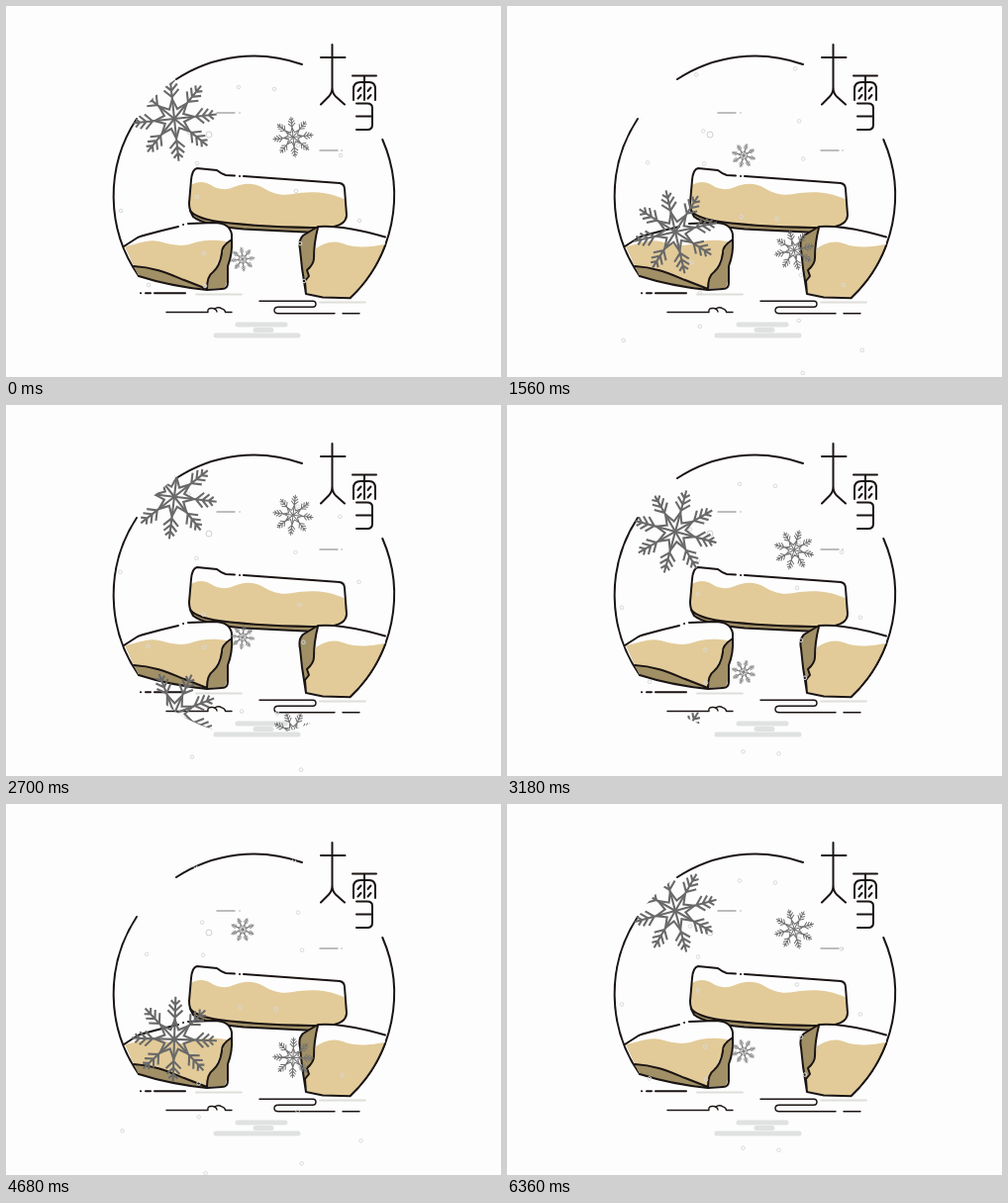
Animation of 500x375 px, one loop 6420 ms. Source, as an HTML page:

```html
<!DOCTYPE html>
<html lang="zh">
<head>
<meta charset="utf-8">
<title>大雪</title>
<style>
html, body { margin: 0; width: 100%; height: 100%; overflow: hidden; background: #fdfdfd; }
svg { display: block; width: 500px; height: 375px; }
.ink { fill: none; stroke: #1a1413; stroke-width: 2; stroke-linecap: round; stroke-linejoin: round; }
.thin { stroke-width: 1.4; }
.snow { fill: #fdfdfd; }
.tan { fill: #e2cb99; }
.dark { fill: #a18f66; }
.gray { fill: none; stroke: #a9a9a9; stroke-width: 1.4; stroke-linecap: round; }
.pale { fill: none; stroke: #dededa; stroke-width: 1.8; stroke-linecap: round; }
.mist { fill: none; stroke: #e0e1e1; stroke-width: 5; stroke-linecap: round; }
.dot { fill: none; stroke: #d9d9d9; stroke-width: 1; }
</style>
</head>
<body>
<svg viewBox="0 0 500 375" role="img" aria-label="大雪">
  <defs>
    <clipPath id="moon"><circle cx="250" cy="192" r="142"/></clipPath>
    <clipPath id="sky"><path d="M108 192A142 142 0 0 1 392 192V375H108Z"/></clipPath>
    <g id="flake" fill="none"></g>
  </defs>

  <!-- mist and ground lines -->
  <path class="mist" d="M234 322H282M252 327.500H268M212 333H295"/>
  <path class="pale" d="M192 291.500H238M317 299.500H363"/>
  <path class="gray" d="M213 108H231M236 108h.1M317 146H335M339 146h.1"/>
  <circle class="dot" cx="205" cy="130" r="3" style="stroke:#d0d0d0"/>
  <path class="ink" d="M136 290.300h.1M141 290.300H146M150 290.300H181"/>
  <path class="ink thin" d="M162 309.500H204Q203 305 208.500 305.500Q212.500 306 213 309M210.500 306.300Q214 303.500 218 305.800Q221.500 307 221.500 309.500H228"/>
  <path class="ink thin" d="M256 298.300H310Q313 298.300 313 301.300T310 304.300H275Q271 304.300 271 307.500T275 310.700H332M340 310.700H357"/>

  <!-- ring -->
  <path class="ink" d="M172 74A142 142 0 0 1 299 59M132 114A142 142 0 0 0 134 273M380.300 135A142 142 0 0 1 347.500 295"/>

  <!-- top stone -->
  <path class="dark" d="M186 207L189 213Q200 222 240 225.500L312 229Q326 229 329 223L262 218Z"/>
  <path class="snow" d="M193 164L213 166Q218 170 222 171L337 179Q342 180 342 186L343 197L187 188Q187 165 193 164Z"/>
  <path class="tan" d="M187 181C193 177 201 177 207 181S221 187 230 183S250 178 260 184S278 192 290 190S322 186 343 196L344 211Q344 222 325 224C290 224 245 222 215 218Q192 215 186 207L185 199Z"/>
  <path class="ink" d="M231 171.500L222 171Q218 170 213 166L193 164Q188 165 187 176L185 199Q185 205 187 208Q194 215 215 218C245 222 290 224 325 224Q344 222 344 211L342 185Q342 180 337 179L240 172M236 172h.1M186 207L189 213Q200 222 240 225.500L312 229"/>

  <!-- left stone -->
  <path class="snow" d="M119 243L133 234L179 221L210 219Q226 219 228 231V238L222 243L203 286L134 272Z"/>
  <path class="tan" d="M120 243C132 241 143 235 155 238S176 244 188 240S210 236 223 238L218 250L202 286L180 277C165 271 150 264 129 263Z"/>
  <path class="dark" d="M129 263C150 264 165 271 180 277L202 286Q165 283 134 273Z"/>
  <path class="dark" d="M227 237Q217 243 218 250Q216 263 209 269Q203 273 203 286L220 285Q224 283 224 263Q229 251 227 237Z"/>
  <path class="ink" d="M119 243L133 234Q137 232 174 223M179 221h.1M184 220L210 219Q226 219 228 231V236Q217 243 218 250Q216 263 209 269Q203 273 203 286L180 277C165 271 150 264 129 263M228 236Q229 250 224 263V280Q224 286 218 286L203 287Q165 283 134 273"/>

  <!-- right stone -->
  <path class="snow" d="M315 223Q340 221 383 234V242L348 295L304 290Z"/>
  <path class="tan" d="M313 245C322 239 330 237 340 240C355 246 370 243 383 241A142 142 0 0 1 347.500 295L320 294L304 290L302 278L306 273L304 267L311 256Z"/>
  <path class="dark" d="M315 223L300 232Q295 237 297 246L299 265L304 291L302 278L306 273L304 267Q311 261 311 255Q311 240 315 223Z"/>
  <path class="ink" d="M383 233.500Q340 221 315 223L300 232Q295 237 297 246L299 265L303 291L320 294.500L347.500 295.300A142 142 0 0 0 383 242M315 224Q311 240 311 255Q311 261 304 267L306 273L302 278L303 291"/>

  <!-- lettering -->
  <path class="ink" d="M318 52H342.500M329.500 39V82Q329.500 88 326 91.500L318 99.500M329.500 82Q329.500 88 333 91.500L342 99.500"/>
  <path class="ink" d="M350 70.500H374M362 71V95M351 95V84Q351 77 358 77H367Q373 77 373 84V95M354 98.500H365Q370 98.500 370 103V120Q370 125 365 125H354M354 111.500H370"/>
  <path class="ink" d="M355.500 86L358.500 82.500M355.500 93.500L358.500 90M365.500 86L368.500 82.500M365.500 93.500L368.500 90"/>

  <g id="dots" clip-path="url(#sky)"></g>
  <g id="flakes" clip-path="url(#moon)"></g>
</svg>
<script>
const LOOP = 6420, STEP = 60, DRIFT = LOOP / 2;
const NS = 'http://www.w3.org/2000/svg';
const $ = id => document.getElementById(id);

function add(parent, tag, attrs) {
  const el = document.createElementNS(NS, tag);
  for (const k in attrs) el.setAttribute(k, attrs[k]);
  return parent.appendChild(el);
}

// Eight feathered arms around a small star
const barbs = [[22, 7.5], [28.5, 6.5], [35, 4.5]]
  .map(([r, s]) => `M${-s} ${-r - s}L0 ${-r}L${s} ${-r - s}`).join('');
for (let i = 0; i < 8; i++)
  add($('flake'), 'path', { d: 'M0 0V-43' + barbs, transform: `rotate(${i * 45})` });
const star = Array.from({ length: 16 }, (_, i) => {
  const r = i % 2 ? 10.5 : 20, a = i * Math.PI / 8;
  return [r * Math.sin(a), -r * Math.cos(a)].map(v => v.toFixed(2)).join(' ');
});
add($('flake'), 'path', { d: 'M' + star.join('L') + 'Z' });

// x, offset from the group's height, scale, colour, line width
const kinds = [
  [170, 0, 1, '#696969', 2.1],
  [290, 18.5, .48, '#707070', 2.1],
  [239, 142, .29, '#747474', 2.4]
];
const starts = [0, 2990, 6442];
const flakes = starts.flatMap(start => kinds.map(([x, dy, scale, stroke, width]) => ({
  start, x, dy, scale,
  el: add($('flakes'), 'use', { href: '#flake', stroke, 'stroke-width': width })
})));

const specks = [
  [235, 82], [271, 84], [193, 159], [193, 193], [116, 207],
  [338, 151], [293, 187], [357, 217], [200, 250], [297, 240],
  [144, 282], [301, 278], [201, 283], [295, 141], [185, 128]
];
const layers = [0, -DRIFT].map(shift => {
  const el = add($('dots'), 'g', {});
  for (const [cx, cy] of specks) add(el, 'circle', { class: 'dot', cx, cy, r: 1.8 });
  return { shift, el };
});

// Specks fall a little faster in the lower half
const fall = u => u < 0 ? u * .0749 : u < 900 ? u * .0833 : 75 + (u - 900) * .0848;

function draw(t) {
  for (const { shift, el } of layers) {
    const u = t % DRIFT + shift;
    el.setAttribute('transform', `translate(${u * .0011} ${fall(u)})`);
  }
  for (const { start, x, dy, scale, el } of flakes) {
    const u = t - start, y = 114 + dy + u * .0733;
    el.setAttribute('transform', `translate(${x} ${y}) rotate(${-6 + u / 9}) scale(${scale})`);
  }
}

const begin = performance.now();
function tick() {
  const t = (performance.now() - begin) % LOOP;
  draw(Math.floor(t / STEP) * STEP);
  requestAnimationFrame(tick);
}
tick();
</script>
</body>
</html>
```
